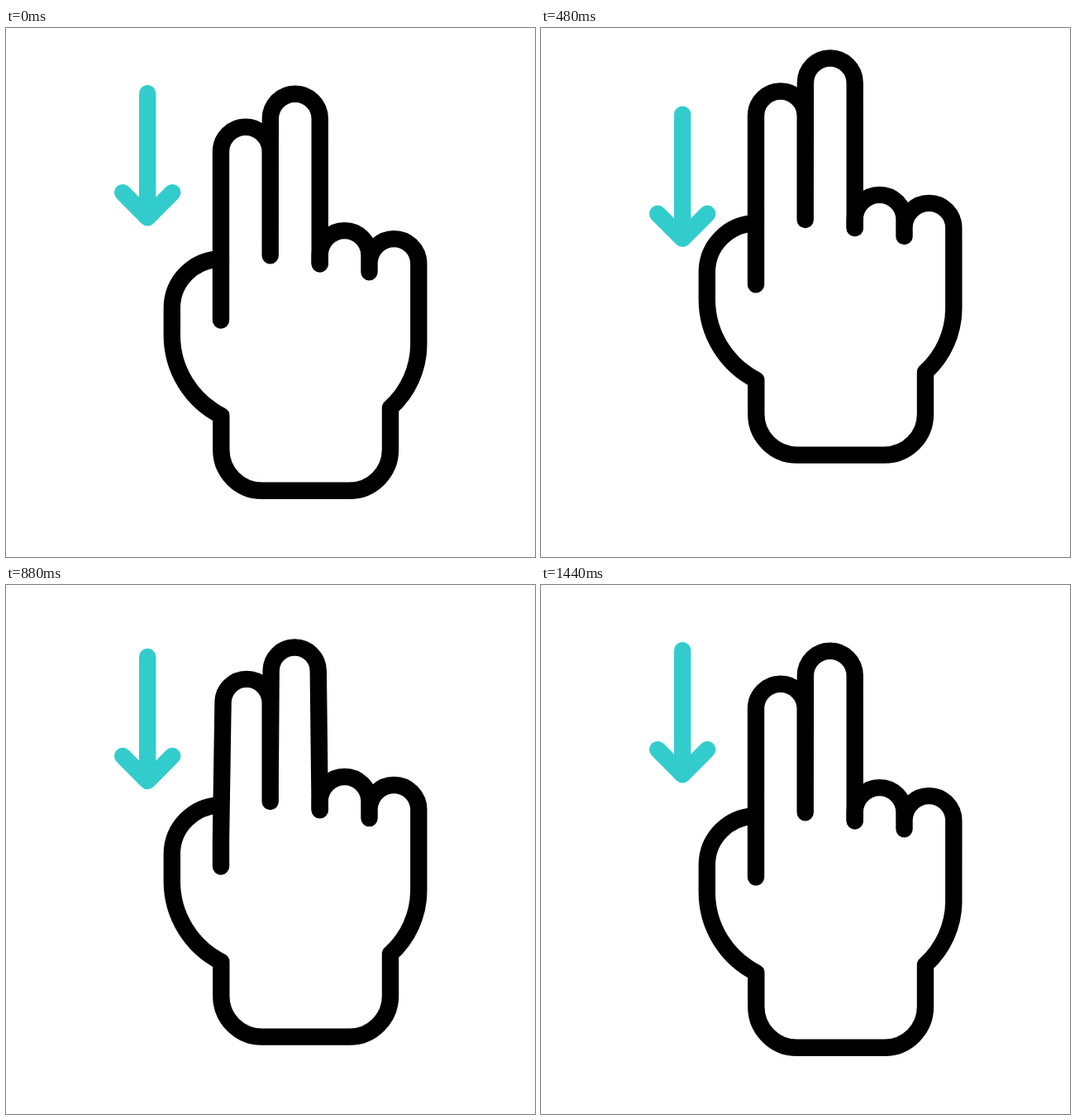
An HTML page that plays this animation: 640 by 640 pixels, repeating every 1480 ms.

```html
<!DOCTYPE html>
<html lang="en">
<head>
<meta charset="utf-8">
<title>Two finger swipe</title>
<style>
  html, body { margin: 0; width: 100%; height: 100%; overflow: hidden; background: #fff; }
  svg { display: block; width: 100vw; height: 100vh; }
  path { fill: none; stroke: #000; stroke-width: 20.4; stroke-linecap: round; stroke-linejoin: round; }
  #arrow path { stroke: #3cc; }
</style>
</head>
<body>
<svg viewBox="0 0 640 640">
  <g id="arrow">
    <path d="M171.2 79.2V229.3M141.2 199.1L171.2 229.3L201.2 199.1"/>
  </g>
  <g id="hand">
    <path d="M260 279.6A59.3 59.3 0 0 0 200.8 339V372A109.2 109.2 0 0 0 260.3 469V510A49.5 49.5 0 0 0 309.8 559.8H415.5A49.5 49.5 0 0 0 465 510V459.5A104 104 0 0 0 499.3 383V285A29.9 29.9 0 0 0 439.5 285V295.3V275A29.9 29.9 0 0 0 379.7 275V285.3"/>
    <path id="fingers"/>
  </g>
</svg>
<script>
  const LOOP = 1480, TICK = 40, LIFT = 43.2, DROP = 25.6;
  const swipes = [
    { start: 40, peak: 480, end: 720 },
    { start: 720, peak: 1157, end: 1440 }
  ];
  const get = id => document.getElementById(id);
  const arrow = get('arrow'), hand = get('hand'), fingers = get('fingers');
  const ease = u => u * u * (3 - 2 * u);
  const shift = (el, y) => el.setAttribute('transform', `translate(0 ${y.toFixed(2)})`);

  // Rounded finger tip from the left side to the right side, with its top at y
  function tip(left, right, y) {
    const r = (right - left) / 2;
    return `L${left} ${y + r}A${r} ${r} 0 0 1 ${right} ${y + r}`;
  }

  function pose(t) {
    const s = swipes.find(s => t >= s.start && t < s.end);
    if (!s) return { lift: 0, bend: 0 };
    if (t >= s.peak) return { lift: 1 - ease((t - s.peak) / (s.end - s.peak)), bend: 0 };
    const u = (t - s.start) / (s.peak - s.start);
    return { lift: ease(u), bend: Math.sin(Math.PI * u) };
  }

  function draw(now) {
    const t = Math.floor((now % LOOP) / TICK) * TICK;
    const { lift, bend } = pose(t);
    shift(hand, -LIFT * lift);
    shift(arrow, DROP * lift);
    fingers.setAttribute('d',
      `M260 353.6V320${tip(260 + 2.8 * bend, 319.7, 119.7 + 8 * bend)}L319.7 275.2` +
      `V260${tip(319.9 + 0.8 * bend, 379.7 - 2.1 * bend, 79.7 + 9.8 * bend)}L379.7 285.3`);
  }

  function loop() {
    draw(performance.now());
    requestAnimationFrame(loop);
  }
  loop();
</script>
</body>
</html>
```
